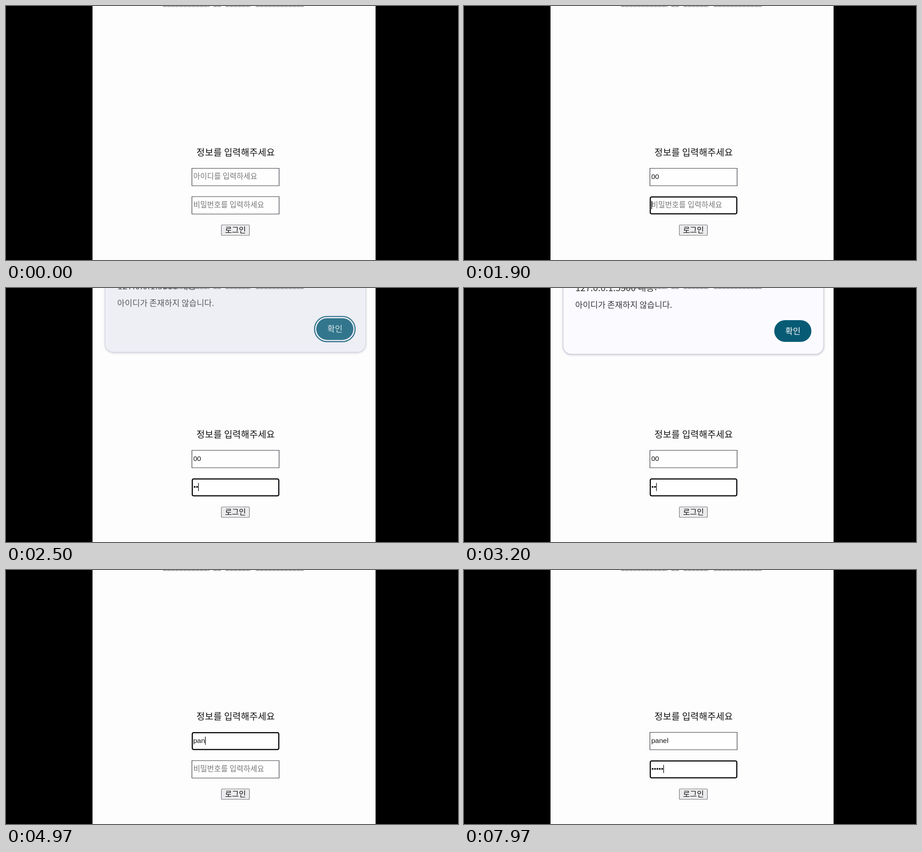
Animation of 998x561 px, one loop 8 s. Source, as an HTML page with a canvas:

```html
<!DOCTYPE html>
<html lang="ko">
<head>
<meta charset="utf-8">
<title>로그인</title>
<style>
  html, body { margin: 0; width: 100%; height: 100%; overflow: hidden; background: #000; }
  canvas { display: block; }
</style>
</head>
<body>
<canvas id="stage" width="998" height="561"></canvas>
<script>
const ctx = document.getElementById('stage').getContext('2d');
const LOOP = 8000;
const KOREAN = '"Noto Sans CJK KR", "Noto Sans CJK", sans-serif';
const LATIN = '"Liberation Sans", Arial, sans-serif';
const USER = 'panel';

// Form states; every step restarts the caret blink, optionally shifted by blinkShift.
const steps = [
  { at: 0, focus: '', id: '', dots: 0 },
  { at: 30, focus: 'id', id: '', dots: 0, blinkShift: 200 },
  { at: 1440, focus: 'id', id: '0', dots: 0 },
  { at: 1600, focus: 'id', id: '00', dots: 0 },
  { at: 1780, focus: 'pw', id: '00', dots: 0 },
  { at: 1960, focus: 'pw', id: '00', dots: 1 },
  { at: 2090, focus: 'pw', id: '00', dots: 2 },
  { at: 4400, focus: 'id', id: '', dots: 0 },
  ...[4600, 4770, 4930, 5230, 5500].map((at, i) =>
    ({ at, focus: 'id', id: USER.slice(0, i + 1), dots: 0 })),
  { at: 7000, focus: 'pw', id: USER, dots: 0 },
  ...[7130, 7270, 7600, 7800, 7920].map((at, i) =>
    ({ at, focus: 'pw', id: USER, dots: i + 1 })),
];
const dialog = { open: 2270, openTime: 285, ringOff: 3200, close: 4270, closeTime: 130, rise: 23 };

const clamp = v => Math.max(0, Math.min(1, v));

function text(str, x, y, size, color, family = KOREAN, spacing = 0) {
  ctx.font = `${size}px ${family}`;
  ctx.letterSpacing = `${spacing}px`;
  ctx.fillStyle = color;
  ctx.fillText(str, x, y);
}

function roundBox(x, y, w, h, r, fill, stroke, lineWidth = 1) {
  ctx.beginPath();
  ctx.roundRect(x, y, w, h, r);
  if (fill) { ctx.fillStyle = fill; ctx.fill(); }
  if (stroke) { ctx.strokeStyle = stroke; ctx.lineWidth = lineWidth; ctx.stroke(); }
}

function field(y, focused) {
  if (focused) roundBox(411.3, y + 1.2, 191, 37.2, 3, '#fff', '#08080c', 2.5);
  else roundBox(410.5, y + 0.5, 192.5, 38.5, 0, '#fefefe', '#34343e', 1.2);
}

function caret(x, y) {
  ctx.fillStyle = '#000';
  ctx.fillRect(x, y, 1.3, 18);
}

function drawForm(state, caretOn) {
  text('정보를 입력해주세요', 420.5, 331, 20, '#101010', KOREAN, 0.3);

  field(358, state.focus === 'id');
  if (state.id) text(state.id, 413.5, 382, 15.5, '#151515', LATIN);
  else text('아이디를 입력하세요', 413.5, 382, 16.5, '#777', KOREAN, 0.1);
  if (caretOn && state.focus === 'id') {
    ctx.font = `15.5px ${LATIN}`;
    ctx.letterSpacing = '0px';
    caret(413.7 + ctx.measureText(state.id).width, 368);
  }

  field(420.5, state.focus === 'pw');
  if (!state.dots) text('비밀번호를 입력하세요', 413.5, 444.5, 16.5, '#777', KOREAN, 0.1);
  ctx.fillStyle = '#101010';
  for (let i = 0; i < state.dots; i++) {
    ctx.beginPath();
    ctx.arc(416.5 + i * 5.25, 439.3, 2, 0, 2 * Math.PI);
    ctx.fill();
  }
  if (caretOn && state.focus === 'pw') caret(413.8 + state.dots * 5.25, 430.5);

  roundBox(475.5, 483.5, 62, 23, 2, '#ececee', '#74747a', 1.2);
  text('로그인', 483.5, 500.5, 16.7, '#101010');
}

function drawDialog(t) {
  const shown = clamp((t - dialog.open) / dialog.openTime) - clamp((t - dialog.close) / dialog.closeTime);
  if (shown <= 0) return;
  ctx.save();
  ctx.globalAlpha = shown;
  ctx.translate(0, -dialog.rise * (1 - shown));
  ctx.shadowColor = 'rgba(70, 70, 110, .45)';
  ctx.shadowBlur = 5;
  ctx.shadowOffsetY = 1;
  roundBox(219, -60, 575, 206, 18, '#fbfbff');
  ctx.shadowColor = 'transparent';
  roundBox(219, -60, 575, 206, 18, null, '#d5d5e4', 1.5);
  text('127.0.0.1:5500 내용:', 246, 7, 20, '#333');
  text('아이디가 존재하지 않습니다.', 245.5, 44, 18.2, '#38383c');
  roundBox(685, 71, 82, 48, 24, '#075b75');
  if (t < dialog.ringOff) roundBox(681.2, 67.2, 89.6, 55.6, 27.8, null, '#075b75', 2.4);
  text('확인', 709.5, 101.5, 18.2, '#fff');
  ctx.restore();
}

// Lower edge of a heading that is scrolled out of view.
function drawHeadingEdge() {
  ctx.save();
  ctx.shadowColor = '#555';
  ctx.shadowBlur = 3;
  ctx.fillStyle = '#77777a';
  for (const [from, to] of [[347, 449], [458, 474], [485, 540], [552, 657]])
    for (let x = from; x < to; x += 9) ctx.fillRect(x, -2, Math.min(7.5, to - x), 2.7);
  ctx.restore();
}

function draw(t) {
  ctx.fillStyle = '#000';
  ctx.fillRect(0, 0, 998, 561);
  ctx.fillStyle = '#fdfdfd';
  ctx.fillRect(191, 0, 625, 561);

  const state = steps.findLast(step => step.at <= t);
  const frozen = t >= dialog.open && t < dialog.close + dialog.closeTime;
  const blinking = (t - state.at + (state.blinkShift || 0)) % 1000 < 500;
  drawForm(state, frozen || blinking);
  drawDialog(t);
  drawHeadingEdge();
}

const start = performance.now();
function tick() {
  draw((performance.now() - start) % LOOP);
  requestAnimationFrame(tick);
}
tick();
</script>
</body>
</html>
```
